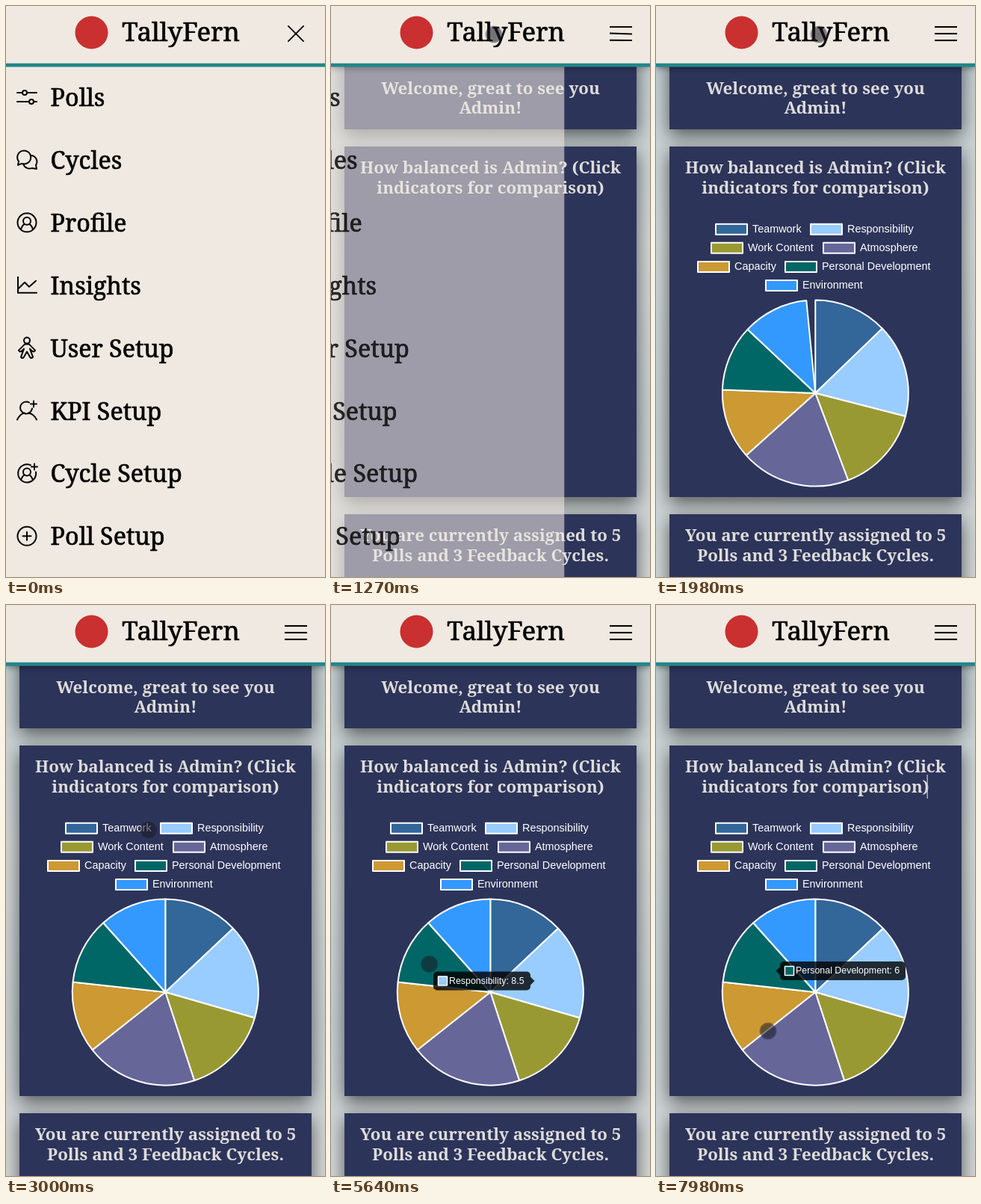
An HTML page with a canvas for the animation above (8000 ms loop, 427x764 px).

```html
<!DOCTYPE html>
<html lang="en">
<head>
<meta charset="utf-8">
<title>Poll dashboard</title>
<style>
  html, body { margin: 0; width: 100%; height: 100%; overflow: hidden; background: #f0e9e1; }
  canvas { display: block; width: 427px; height: 764px; }
</style>
</head>
<body>
<canvas id="stage"></canvas>
<script>
const W = 427, H = 764, LOOP = 8000;
const CREAM = '#f0e9e1', NAVY = '#2d345a', INK = '#050505', TAU = Math.PI * 2;
const SERIF = '"Noto Serif", serif', SANS = '"Liberation Sans", Arial, sans-serif';

const canvas = document.getElementById('stage');
const ctx = canvas.getContext('2d');
const dpr = window.devicePixelRatio || 1;
canvas.width = W * dpr;
canvas.height = H * dpr;

const slices = [
  { name: 'Teamwork', value: 6.7, color: '#336699', x: 79, row: 0 },
  { name: 'Responsibility', value: 8.5, color: '#99ccff', x: 206, row: 0 },
  { name: 'Work Content', value: 8, color: '#999933', x: 73, row: 1 },
  { name: 'Atmosphere', value: 10, color: '#666699', x: 223, row: 1 },
  { name: 'Capacity', value: 6.4, color: '#cc9933', x: 55, row: 2 },
  { name: 'Personal Development', value: 6, color: '#006666', x: 172, row: 2 },
  { name: 'Environment', value: 6, color: '#3399ff', x: 146, row: 3 }
];
const total = slices.reduce((sum, s) => sum + s.value, 0);

// Icons are drawn around their own centre.
const menu = [
  ['Polls', 'M-13-6H-6M0-6H13M-13 6H3M9 6H13M0-6A3 3 0 1 1-6-6A3 3 0 1 1 0-6M9 6A3 3 0 1 1 3 6A3 3 0 1 1 9 6'],
  ['Cycles', 'M-12 7L-11 2A9 9 0 1 1-7 5ZM6-6A8.5 8.5 0 0 1 12 7L13 12L7 11A9 9 0 0 1-5 5'],
  ['Profile', 'M12.5 0A12.5 12.5 0 1 1-12.5 0A12.5 12.5 0 1 1 12.5 0M5-2A5 5 0 1 1-5-2A5 5 0 1 1 5-2M-8 9Q-6 3-3 2M8 9Q6 3 3 2'],
  ['Insights', 'M-12-11V10H13M-11 4L-3-4L3 2L12-6'],
  ['User Setup', 'M4-10A4 4 0 1 1-4-10A4 4 0 1 1 4-10M-3-5H3L11 3Q10 6 7 4L4 1L8 12Q6 15 4 12L0 5L-4 12Q-6 15-8 12L-4 1L-7 4Q-10 6-11 3Z'],
  ['KPI Setup', 'M3-11A8 8 0 1 0 7-3M-13 12Q-9 4-3 3M13 12Q9 4 2 3M9-13V-5M5-9H13'],
  ['Cycle Setup', 'M5-11A12 12 0 1 0 12-2M5-2A5 5 0 1 1-5-2A5 5 0 1 1 5-2M-8 9Q-6 3-3 2M8 9Q6 3 3 2M10-13V-5M6-9H14'],
  ['Poll Setup', 'M12.5 0A12.5 12.5 0 1 1-12.5 0A12.5 12.5 0 1 1 12.5 0M-5.5 0H5.5M0-5.5V5.5']
].map(([label, path]) => ({ label, icon: new Path2D(path) }));

const moves = [
  { from: 40, to: 790, x0: 348, y0: 670, x: 218, y: 38 },
  { from: 2500, to: 3000, x0: 218, y0: 38, x: 191, y: 301 },
  { from: 3490, to: 3600, x0: 191, y0: 301, x: 192, y: 307 },
  { from: 3850, to: 4440, x0: 192, y0: 307, x: 274, y: 512 },
  { from: 5050, to: 5830, x0: 274, y0: 512, x: 107, y: 475 },
  { from: 7540, to: 7850, x0: 107, y0: 475, x: 150, y: 570 }
];
const presses = [[850, 950], [4480, 4720], [6200, 6400]];

const clamp = v => Math.max(0, Math.min(1, v));
const span = (t, from, to) => clamp((t - from) / (to - from));
const mix = (a, b, k) => a + (b - a) * k;
const smooth = k => k * k * (3 - 2 * k);
const outQuart = k => 1 - (1 - k) ** 4;

function text(str, x, y, font, color, align = 'left', baseline = 'alphabetic') {
  ctx.font = font;
  ctx.fillStyle = color;
  ctx.textAlign = align;
  ctx.textBaseline = baseline;
  ctx.fillText(str, x, y);
}

// A hairline outline gives the regular serif a medium weight.
function mediumText(str, x, y, size, align) {
  text(str, x, y, `500 ${size}px ${SERIF}`, INK, align);
  ctx.strokeStyle = INK;
  ctx.lineWidth = .7;
  ctx.lineJoin = 'round';
  ctx.strokeText(str, x, y);
}

function swatch(x, y, w, h, color, line) {
  ctx.fillStyle = color;
  ctx.fillRect(x, y, w, h);
  ctx.strokeStyle = '#fff';
  ctx.lineWidth = line;
  ctx.strokeRect(x, y, w, h);
}

function card(y, h, lines, baseline) {
  ctx.save();
  ctx.shadowColor = 'rgba(0,0,0,.6)';
  ctx.shadowBlur = 23 * dpr;
  ctx.shadowOffsetY = 8 * dpr;
  ctx.fillStyle = NAVY;
  ctx.fillRect(18, y, 391, h);
  ctx.restore();
  lines.forEach((line, i) =>
    text(line, 213.5, baseline + i * 26.7, `bold 22.3px ${SERIF}`, '#dddcd9', 'center'));
}

function drawPage() {
  const bg = ctx.createLinearGradient(0, 80, 0, H);
  bg.addColorStop(0, '#c4cfd3');
  bg.addColorStop(.35, '#d2d8d8');
  bg.addColorStop(.7, '#c8d0d2');
  bg.addColorStop(1, '#d3d8d8');
  ctx.fillStyle = bg;
  ctx.fillRect(0, 0, W, H);
  card(60, 105, ['Welcome, great to see you', 'Admin!'], 117.5);
  card(188, 469, ['How balanced is Admin? (Click', 'indicators for comparison)'], 224);
  card(680, 110, ['You are currently assigned to 5', 'Polls and 3 Feedback Cycles.'], 716);
}

function drawChart(t) {
  if (t < 1333) return;
  for (const s of slices) {
    const y = 298.7 + s.row * 25.1;
    swatch(s.x + 1, y - 7, 42, 14, s.color, 2);
    text(s.name, s.x + 50, y + .5, `14.4px ${SANS}`, '#fff', 'left', 'middle');
  }
  const sweep = TAU * outQuart(span(t, 1333, 2333));
  let angle = -Math.PI / 2;
  ctx.strokeStyle = '#fff';
  ctx.lineWidth = 2;
  ctx.lineJoin = 'bevel';
  for (const s of slices) {
    const end = angle + sweep * s.value / total;
    ctx.beginPath();
    ctx.moveTo(213.3, 518);
    ctx.arc(213.3, 518, 124.5, angle, end);
    ctx.closePath();
    ctx.fillStyle = s.color;
    ctx.fill();
    ctx.stroke();
    angle = end;
  }
}

function drawTooltip(t) {
  const alpha = span(t, 4480, 4780);
  if (!alpha) return;
  const second = t >= 6210;
  const k = outQuart(span(t, 6210, 6640));
  const slice = slices[second ? 5 : 1];
  const x = mix(137, 166, k), y = mix(490.5, 477, k), w = mix(130, 168, k), h = 25;
  const mid = y + h / 2;
  ctx.save();
  ctx.globalAlpha = alpha;
  ctx.fillStyle = 'rgba(0,0,0,.8)';
  ctx.beginPath();
  ctx.roundRect(x, y, w, h, 5);
  const edge = second ? x : x + w, tip = second ? -5.5 : 5.5;
  ctx.moveTo(edge, mid - 5.5);
  ctx.lineTo(edge + tip, mid);
  ctx.lineTo(edge, mid + 5.5);
  ctx.fill();
  swatch(x + 6.5, mid - 6, 12, 12, slice.color, 1.5);
  text(`${slice.name}: ${slice.value}`, x + 21, mid + .5, `12.4px ${SANS}`, '#fff', 'left', 'middle');
  ctx.restore();
}

function drawCaret(t) {
  if (t < 4650 || (t - 4650) % 1043 > 525) return;
  ctx.fillStyle = '#c9cad0';
  ctx.fillRect(362.6, 227, 1.2, 32);
}

function drawMenu(t) {
  const k = span(t, 945, 1445);
  if (k === 1) return;
  ctx.save();
  ctx.translate(-432 * k ** 3, 0);
  ctx.globalAlpha = 1 - k * k;
  ctx.fillStyle = CREAM;
  ctx.fillRect(0, 0, 432, H);
  ctx.globalAlpha = 1 - k ** 4;
  ctx.lineCap = 'round';
  menu.forEach(({ label, icon }, i) => {
    const y = 122 + i * 83.9;
    ctx.save();
    ctx.translate(28, y);
    ctx.strokeStyle = INK;
    ctx.lineWidth = 2;
    ctx.lineJoin = 'round';
    ctx.stroke(icon);
    ctx.restore();
    mediumText(label, 59.5, y + 12, 32.3);
  });
  ctx.restore();
}

function bar(x, y, degrees, alpha = 1) {
  ctx.save();
  ctx.globalAlpha = alpha;
  ctx.translate(x, y);
  ctx.rotate(degrees * Math.PI / 180);
  ctx.beginPath();
  ctx.moveTo(-15, 0);
  ctx.lineTo(15, 0);
  ctx.stroke();
  ctx.restore();
}

function drawHeader(t) {
  ctx.save();
  if (t > 945) {
    ctx.shadowColor = `rgba(0,0,0,${.4 * span(t, 945, 1445)})`;
    ctx.shadowBlur = 8 * dpr;
    ctx.shadowOffsetY = 2 * dpr;
  }
  ctx.fillStyle = '#21868a';
  ctx.fillRect(0, 70, W, 11.5);
  ctx.restore();
  ctx.fillStyle = CREAM;
  ctx.fillRect(0, 0, W, 76.7);
  ctx.fillStyle = '#c9302f';
  ctx.beginPath();
  ctx.arc(114.5, 35.5, 22, 0, TAU);
  ctx.fill();
  mediumText('TallyFern', 234, 46.5, 34.8, 'center');

  const k = smooth(span(t, 890, 1300));
  ctx.strokeStyle = INK;
  ctx.lineCap = 'butt';
  ctx.lineWidth = mix(1.8, 2.1, k);
  bar(388, mix(37, 46, k), 45 * (1 - k));
  bar(388, 37, 135 * (1 - k));
  bar(388, 28, 0, span(k, .65, 1));
}

function drawPointer(t) {
  if (t < 40) return;
  const m = moves.filter(move => move.from <= t).pop();
  const k = smooth(span(t, m.from, m.to));
  const x = mix(m.x0, m.x, k), y = mix(m.y0, m.y, k);
  const pressed = presses.some(([from, to]) => t >= from && t < to);
  ctx.beginPath();
  ctx.arc(x, y, pressed ? 13 : 11.5, 0, TAU);
  if (pressed) {
    ctx.fillStyle = 'rgba(200,200,60,.8)';
    ctx.fill();
    ctx.beginPath();
    ctx.arc(x, y, 10.5, 0, TAU);
    ctx.fillStyle = 'rgba(150,165,65,.75)';
  } else {
    const shade = ctx.createRadialGradient(x, y, 0, x, y, 11.5);
    shade.addColorStop(0, 'rgba(24,24,34,.58)');
    shade.addColorStop(.82, 'rgba(24,24,34,.55)');
    shade.addColorStop(1, 'rgba(24,24,34,.3)');
    ctx.fillStyle = shade;
  }
  ctx.fill();
}

function render(t) {
  ctx.setTransform(dpr, 0, 0, dpr, 0, 0);
  drawPage();
  drawChart(t);
  drawTooltip(t);
  drawCaret(t);
  drawMenu(t);
  drawHeader(t);
  drawPointer(t);
}

const start = performance.now();
function tick() {
  render((performance.now() - start) % LOOP);
  requestAnimationFrame(tick);
}
tick();
</script>
</body>
</html>
```
